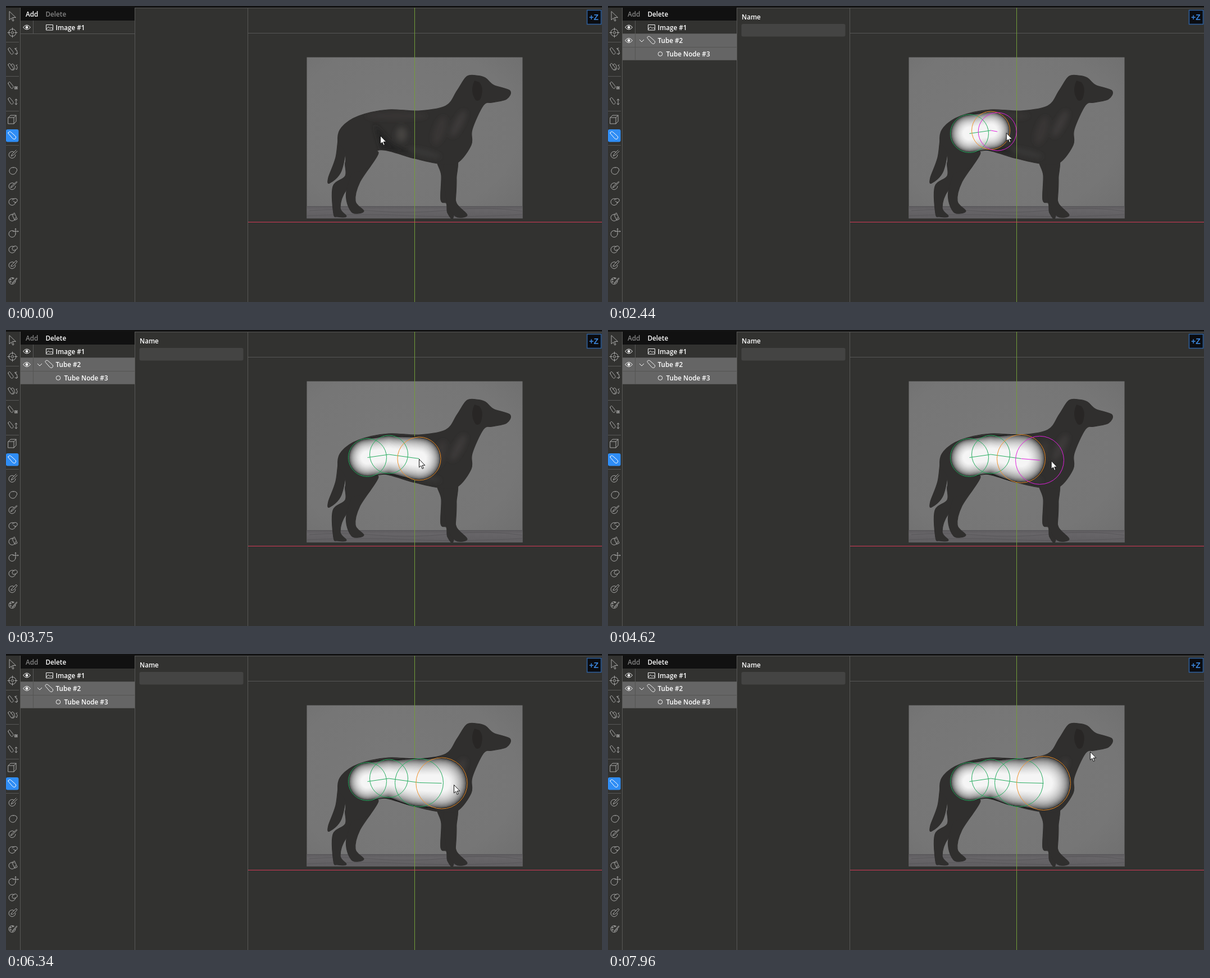
Write an HTML page with a canvas that moves like this. It is 1061 px wide and 528 px high and loops after 7.99 s.

```html
<!DOCTYPE html>
<html lang="en">
<head>
<meta charset="utf-8">
<title>Tube modelling</title>
<style>
  html, body { margin: 0; width: 100%; height: 100%; overflow: hidden; background: #323230; }
  svg, canvas { position: absolute; left: 0; top: 0; width: 1061px; height: 528px; }
  text { font: 600 11.7px "Open Sans", "Noto Sans", sans-serif; fill: #fff; }
  .line { fill: none; stroke: #575756; }
  .icon { fill: none; stroke: #a9a9a8; stroke-linejoin: round; stroke-linecap: round; }
  .white { fill: none; stroke: #f4f4f4; stroke-linejoin: round; }
</style>
</head>
<body>
<svg viewBox="0 0 1061 528">
  <defs>
    <linearGradient id="floor" x2="0" y2="1">
      <stop offset="0" stop-color="#5e5c5f"/><stop offset=".3" stop-color="#676568"/><stop offset="1" stop-color="#605e61"/>
    </linearGradient>
    <radialGradient id="wall" cx=".45" cy=".45" r=".75">
      <stop offset="0" stop-color="#797979"/><stop offset=".7" stop-color="#767676"/><stop offset="1" stop-color="#6f6f6f"/>
    </radialGradient>
    <filter id="soft"><feGaussianBlur stdDeviation="4"/></filter>
    <clipPath id="dogClip"><path id="torsoClip"/></clipPath>
    <path id="bone" d="M-7-4.5C-7-7-3.5-7.5-2-5.8L5.2.6C9 4 4.5 8.6 1 5.4L-6-2.6Q-7-3.5-7-4.5Z"/>
    <path id="smallBone" d="M-7-3C-7-6-4-6.500-3-4L1 1C4 4 0 8-2.500 5L-6.300-1Q-7-2-7-3Z"/>
    <path id="ball" d="M3.5-4.4A6 6 0 1 0 6 .5"/>
    <g id="eye" class="white">
      <path d="M-6.500 0Q0-8 6.500 0Q0 8-6.500 0Z"/><circle r="2" fill="#fff"/>
    </g>
  </defs>

  <rect width="1061" height="528" fill="#323230"/>
  <rect width="1061" height="3" fill="#121212"/>
  <rect x="26" y="3" width="203" height="23" fill="#111"/>
  <path class="line" d="M25.5 3V528M229.5 3V528M430.5 3V528M230 3.5H1061M431 48.5H1061M26 49.5H229M48.5 26V49M0 64.5H23M0 125.5H23M0 187.5H23M0 248.5H23"/>

  <rect x="535.5" y="91.5" width="384" height="287.5" fill="url(#wall)"/>
  <rect x="535.5" y="357" width="384" height="22" fill="url(#floor)"/>
  <path d="M536 357.5H919M540 365Q600 361 660 366T790 364T919 366M536 374Q640 370 720 374T919 372" fill="none" stroke="#555356" opacity=".7"/>
  <g id="dog" fill="#302f2e" stroke="#302f2e" stroke-width="1.2"></g>
  <g clip-path="url(#dogClip)">
    <g filter="url(#soft)" fill="#444240">
      <ellipse cx="704" cy="229" rx="10" ry="13"/>
      <ellipse cx="695" cy="196" rx="55" ry="6" opacity=".4"/>
      <ellipse cx="772" cy="222" rx="10" ry="26" opacity=".4" transform="rotate(18 772 222)"/>
      <ellipse cx="805" cy="210" rx="8" ry="26" opacity=".6" transform="rotate(28 805 210)"/>
      <ellipse cx="745" cy="262" rx="30" ry="5" opacity=".5" transform="rotate(14 745 262)"/>
      <path d="M655 210L668 256L735 266L690 248Z" fill="#242322"/>
    </g>
    <path d="M834 133Q825 152 836 168Q845 172 847 158Q850 145 843 136Z" fill="#262524" opacity=".8"/>
  </g>

  <path d="M727.5 3V528" stroke="#729c3a"/>
  <path d="M431 385.5H1061" stroke="#d23a56"/>
  <rect x="1034.5" y="7.5" width="25" height="25" fill="#0b0c10" stroke="#2c5f9e" stroke-width="1.5"/>
  <text x="1038" y="25" style="font:bold 14px 'Liberation Sans',sans-serif;fill:#3a84d8">+Z</text>

  <g class="icon">
    <path d="M6 10V25L9.5 21.5L12 27L14 26L11.5 20.5H17Z"/>
    <g transform="translate(11.5 47.5)"><circle r="6.5"/><circle r="2"/><path d="M0-8.500V-4M0 4V8.500M-8.500 0H-4M4 0H8.500"/></g>
    <g transform="translate(11 80)"><use href="#smallBone"/><path d="M5-4Q11-1 8 6M5-4l3-1M5-4l2 3M8 6l-3-1M8 6l2-2"/></g>
    <g transform="translate(11 108)"><use href="#smallBone"/><path d="M-2-2Q0-7 3-3Q6 2 3 6Q0 7-1 5M7-2Q11 1 8 5M7-2l2-1M8 5l-2-1"/></g>
    <g transform="translate(11 141)"><use href="#smallBone"/><path d="M5 3l4 4M9 3l-4 4M5 3h4v4h-4z"/></g>
    <g transform="translate(11 169)"><use href="#smallBone"/><path d="M7-3V7M5-1l2-2l2 2M5 5l2 2l2-2"/></g>
    <path d="M4 199L8 195H18V206L14 210H4ZM4 199H14V210M14 199L18 195"/>
    <rect y="220" width="22.5" height="22.5" rx="3" fill="#2f8df5" stroke="none"/>
    <use href="#bone" x="11" y="231" stroke="#fff"/>
    <g transform="translate(11 265)"><use href="#ball"/><path d="M9-6L2 1L-2 3L0-1L7-8"/></g>
    <g transform="translate(11 293)"><path d="M2-5A6.200 6.200 0 1 0 7 3Q10 0 8-3Q5-6 2-5Z"/></g>
    <g transform="translate(11 321)"><use href="#ball"/><path d="M9-7L0 2L-3 3L-1 0L8-8"/></g>
    <g transform="translate(11 349)"><use href="#ball"/><path d="M0-3Q5-8 9-4Q10 1 5 2M2-1L6 2"/></g>
    <g transform="translate(11 377)"><use href="#ball"/><path d="M0-5L4-8L9 3L5 5Z"/></g>
    <g transform="translate(11 406)"><use href="#ball"/><path d="M6-9V1M1-4H11M5-8l1-1l1 1M10-5l1 1l-1 1"/></g>
    <g transform="translate(11 434)"><use href="#ball"/><path d="M0-1Q1-6 6-6Q10-5 9-1Q6 3 2 2Z"/></g>
    <g transform="translate(11 462)"><use href="#ball"/><path d="M-2 2Q2 3 4 0L9-6L7-8L1-2Q-2 0-2 2Z"/></g>
    <g transform="translate(11 490)"><use href="#ball"/><circle cx="-3" cy="-2" r="1"/><circle cx="1" cy="-4" r="1"/><circle cx="-3" cy="2" r="1"/><path d="M9-4L2 4L0 5L1 3L8-5"/></g>
  </g>

  <g id="panel">
    <rect x="26" y="50" width="203" height="47" fill="#656565"/>
    <path d="M26 73.5H229M26 96.5H229M48.5 50V97" stroke="#545453"/>
    <use href="#eye" x="37" y="61.5"/>
    <path class="white" d="M56 60l4 4l4-4"/>
    <use href="#bone" class="white" x="77" y="61"/>
    <circle class="white" cx="93" cy="85.5" r="3.8"/>
    <text x="88.5" y="66">Tube #2</text>
    <text x="103.5" y="89.5">Tube Node #3</text>
    <text x="238" y="24">Name</text>
    <rect x="237.5" y="32" width="185" height="22.5" rx="3" fill="#444443"/>
  </g>
  <use href="#eye" x="37" y="38"/>
  <g class="white"><rect x="71.5" y="33.5" width="12" height="9.5"/><path d="M72 41l3.5-4l3 3l2-2l3 3"/></g>
  <text x="88.5" y="42.5">Image #1</text>
  <text id="add" x="35" y="19">Add</text>
  <text id="del" x="70.5" y="19">Delete</text>
</svg>
<canvas id="stage" width="1061" height="528"></canvas>

<script>
const LOOP = 7990, LAG = 80;
const GREEN = '#27ad60', ORANGE = '#f0932e', MAGENTA = '#e01fdc';
const byId = id => document.getElementById(id);
const ctx = byId('stage').getContext('2d');

const mix = (a, b, u) => a + (b - a) * u;
const progress = (t, from, to) => Math.min(1, Math.max(0, (t - from) / (to - from)));
const easeOut = u => 1 - (1 - u) ** 4;

// Closed smooth outline through "x,y x,y ..."
function outline(points) {
  const p = points.split(' ').map(s => s.split(',').map(Number));
  const at = i => p[(i + p.length) % p.length];
  let d = 'M' + p[0];
  p.forEach((a, i) => {
    const z = at(i - 1), b = at(i + 1), c = at(i + 2);
    const h1 = a.map((v, k) => v + (b[k] - z[k]) / 6);
    const h2 = b.map((v, k) => v - (c[k] - a[k]) / 6);
    d += `C${h1} ${h2} ${b}`;
  });
  return d + 'Z';
}

const torso = outline('820,126 837,124 853,128 868,141 897,151 891,166 866,172 850,177 830,220 828,248 803,280 770,281 727,272 664,257 645,288 608,296 604,262 591,240 598,216 628,196 680,185 735,187 783,178 803,151');
const tail = outline('594,222 587,270 574,306 576,316 597,294 606,240');
const legs = [
  '607,275 604,303 582,322 583,370 590,376 606,375 595,360 606,328 650,282',
  '630,270 606,330 615,367 637,366 622,348 630,314 663,262',
  '769,278 775,302 774,346 784,352 786,369 797,374 800,290',
  '780,276 784,345 800,375 821,373 802,352 799,325 804,274'
].map(outline);
byId('dog').innerHTML = [tail, ...legs, torso].map(d => `<path d="${d}"/>`).join('');
byId('torsoClip').setAttribute('d', torso);

// aim: hover starts; born: pressed; solid: joins the tube; radius grows from r to full until done
const nodes = [
  { x: 643, y: 227, r: 34, full: 34, aim: 250, born: 1160, solid: 1980, done: 1980 },
  { x: 681, y: 221.5, r: 34, full: 34, aim: 1560, born: 1830, solid: 1980, done: 2130 },
  { x: 735, y: 229, r: 34, full: 43, aim: 2320, born: 3130, solid: 3290, done: 4360 },
  { x: 775, y: 230, r: 43, full: 48, aim: 4500, born: 5350, solid: 5600, done: 7220 }
];
const REFIT = 7340;

// Pointer moves: from, to, x, y
const moves = [
  [150, 910, 644, 228], [1560, 1830, 682, 222], [2320, 3070, 735, 230],
  [4500, 4700, 790, 233], [4750, 5260, 776, 231], [6150, 6340, 797, 233], [REFIT, 7930, 858, 174]
];

function pointerAt(t) {
  return moves.reduce(([x, y], [from, to, mx, my]) => {
    const u = easeOut(progress(t, from, to));
    return [mix(x, mx, u), mix(y, my, u)];
  }, [666, 231]);
}

function ring(x, y, r, color) {
  ctx.beginPath();
  ctx.arc(x, y, r, 0, 7);
  ctx.strokeStyle = color;
  ctx.stroke();
}

function link(points, color) {
  ctx.beginPath();
  points.forEach(p => ctx.lineTo(p.x, p.y));
  ctx.strokeStyle = color;
  ctx.stroke();
}

// Nested hulls shaded by how far the surface faces the viewer
function tube(list) {
  const spine = [];
  for (let i = 1; i < list.length; i++) {
    const a = list[i - 1], b = list[i];
    for (let u = 0; u <= 1; u += 1 / 32) {
      const ease = u * u * (3 - 2 * u);
      spine.push([mix(a.x, b.x, u), mix(a.y, b.y, u), mix(a.r, b.r, ease)]);
    }
  }
  for (let k = 1; k > 0.3; k -= 0.025) {
    const v = Math.round(Math.min(255, 18 + 240 * Math.sqrt(1 - k * k)));
    ctx.fillStyle = `rgb(${v},${v},${v})`;
    ctx.beginPath();
    for (const [x, y, r] of spine) {
      ctx.moveTo(x + r * k, y);
      ctx.arc(x, y, r * k, 0, 2 * Math.PI);
    }
    ctx.fill();
  }
}

const arrow = new Path2D('M.5.5V15L3.8 12L6 17.5L8.300 16.500L6 11.300H10.800Z');

function draw(t) {
  const made = t >= nodes[0].born;
  byId('panel').style.display = made ? '' : 'none';
  byId('add').style.fill = made ? '#858585' : '#fff';
  byId('del').style.fill = made ? '#fff' : '#858585';

  ctx.clearRect(0, 0, 1061, 528);
  ctx.lineWidth = 1;
  const live = nodes.filter(n => t >= n.born)
    .map(n => ({ ...n, r: mix(n.r, n.full, progress(t, n.born, n.done)) }));
  if (t >= REFIT) live[2].x -= 4;
  const solid = live.filter(n => t >= n.solid);
  const last = live[live.length - 1];
  const next = nodes[live.length];

  ctx.save();
  ctx.translate(0.5, 0.5);
  if (solid.length > 1) tube(solid);
  if (live.length > solid.length) link(live.slice(-2), '#8b958d');
  link(solid, GREEN);
  live.forEach(n => ring(n.x, n.y, n.r, n === last ? ORANGE : GREEN));
  if (next && t >= next.aim + LAG) {
    const [x, y] = pointerAt(t - LAG);
    if (last) link([last, { x, y }], MAGENTA);
    ring(x, y, next.r, MAGENTA);
  }
  ctx.restore();

  ctx.save();
  ctx.translate(...pointerAt(t));
  ctx.fillStyle = '#fff';
  ctx.strokeStyle = '#111';
  ctx.fill(arrow);
  ctx.stroke(arrow);
  ctx.restore();
}

function tick() {
  draw(performance.now() % LOOP);
  requestAnimationFrame(tick);
}
tick();
</script>
</body>
</html>
```
